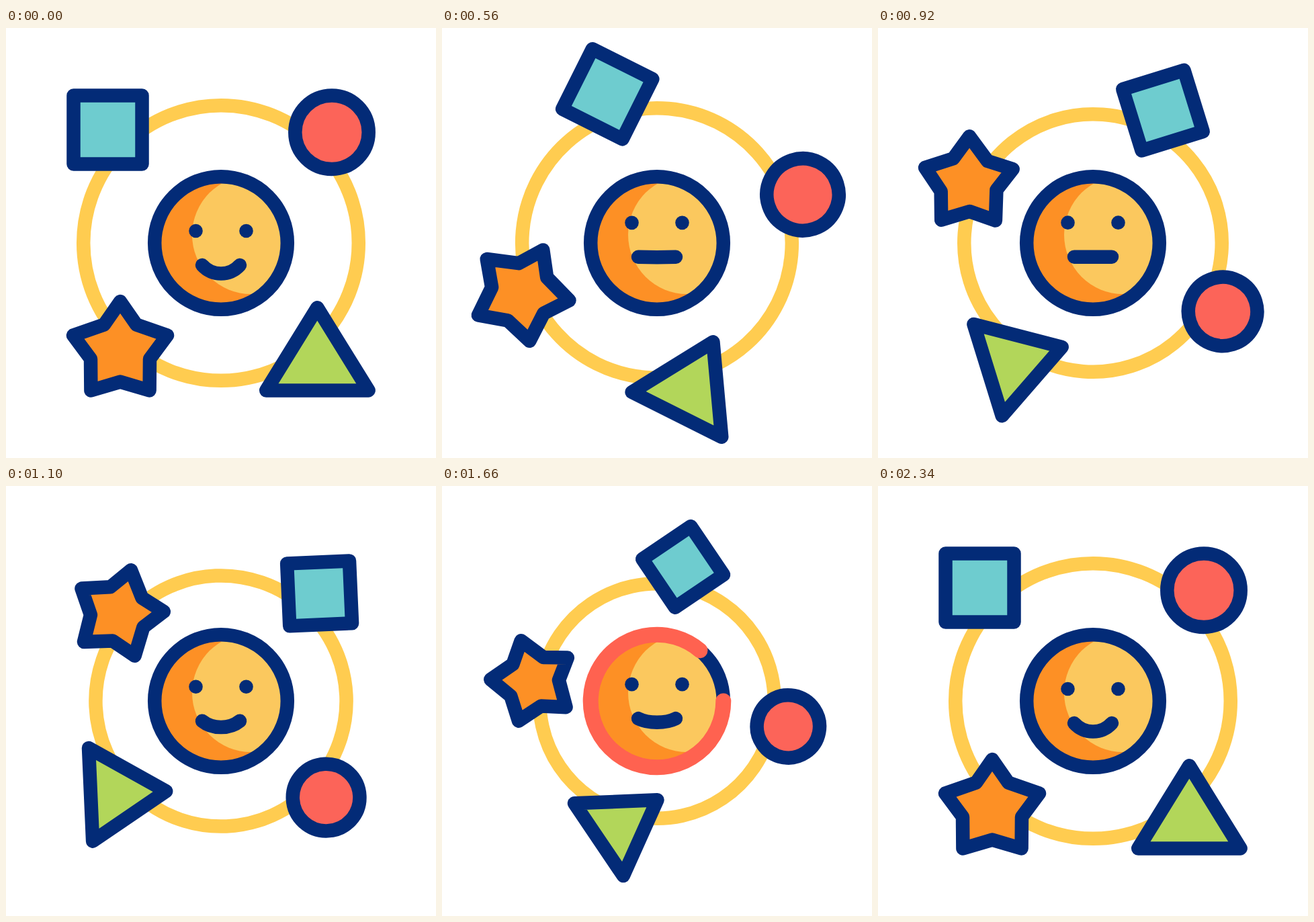
Animation of 640x640 px, one loop 2400 ms. Source, as an HTML page:

```html
<!DOCTYPE html>
<html lang="en">
<head>
<meta charset="utf-8">
<title>Orbiting shapes</title>
<style>
  html, body { margin: 0; width: 100%; height: 100%; overflow: hidden; background: #fff; }
  svg { display: block; width: 640px; height: 640px; }
  .line { fill: none; stroke: #032b77; stroke-width: 20.5; stroke-linecap: round; }
  #orbit { stroke: #032b77; stroke-linejoin: round; }
</style>
</head>
<body>
<svg viewBox="0 0 640 640">
  <clipPath id="disc"><circle cx="320" cy="320" r="98"/></clipPath>

  <g id="orbit">
    <circle cx="320" cy="320" r="204.8" fill="none" stroke="#ffcc50"/>
    <rect x="100.5" y="100.5" width="102" height="102" fill="#6ecccf"/>
    <circle cx="485" cy="155.2" r="54.7" fill="#fc6459"/>
    <path d="M463.3 416.2L539.6 539.4H387.2Z" fill="#b2d65a"/>
    <path d="M170 407L194 441.5L240 457.5L214 492.5L213.6 539.5L170 526.6L126.4 539.5L126 492.5L100 457.5L146 441.5Z" fill="#fd9025"/>
  </g>

  <circle cx="320" cy="320" r="98" fill="#fd9025"/>
  <circle cx="365.3" cy="307.8" r="88.3" fill="#fbc85e" clip-path="url(#disc)"/>
  <circle class="line" cx="320" cy="320" r="98.8"/>
  <path id="sweep" fill="none" stroke="#ff6250" stroke-width="23" stroke-linecap="round"/>
  <g id="eyes" fill="#032b77">
    <circle cx="282.5" cy="302" r="10.3"/>
    <circle cx="357.5" cy="302" r="10.3"/>
  </g>
  <path id="mouth" class="line"/>
</svg>

<script>
const LOOP = 2400, STEP = 20, CENTER = 320, SWEEP_R = 98.8, STROKE = 20.5;
const [orbit, sweep, eyes, mouth] =
  ['orbit', 'sweep', 'eyes', 'mouth'].map(id => document.getElementById(id));

// Each track lists [time in ms, value]; values ease smoothly between keys.
const tracks = {
  angle: [[200, 0], [1200, 90], [2300, 0]],
  scale: [[200, 1], [1800, 0.85], [2300, 1]],
  smile: [[200, 1], [600, 0], [900, 0], [1200, 1], [1500, 1], [1800, 0], [2300, 1]],
  head:  [[1200, 0], [1800, 1]],
  tail:  [[1800, 0], [2300, 1]]
};

function valueAt(keys, t) {
  if (t <= keys[0][0]) return keys[0][1];
  for (let i = 1; i < keys.length; i++) {
    const [t0, a] = keys[i - 1], [t1, b] = keys[i];
    if (t < t1) {
      const s = (t - t0) / (t1 - t0);
      return a + (b - a) * s * s * (3 - 2 * s);
    }
  }
  return keys[keys.length - 1][1];
}

function arcPath(from, to) {
  const point = turn => {
    const a = turn * 2 * Math.PI;
    return `${CENTER + SWEEP_R * Math.cos(a)} ${CENTER + SWEEP_R * Math.sin(a)}`;
  };
  const arc = turn => `A${SWEEP_R} ${SWEEP_R} 0 0 1 ${point(turn)}`;
  const span = Math.max(to - from, 0.0001);
  return 'M' + point(from) + [1, 2, 3].map(i => arc(from + span * i / 3)).join('');
}

function draw(t) {
  const { angle, scale, smile, head, tail } = Object.fromEntries(
    Object.entries(tracks).map(([name, keys]) => [name, valueAt(keys, t)]));

  orbit.setAttribute('transform',
    `translate(${CENTER} ${CENTER}) rotate(${angle}) scale(${scale}) translate(${-CENTER} ${-CENTER})`);
  // Line weight stays constant while the shapes shrink.
  orbit.setAttribute('stroke-width', STROKE / scale);

  eyes.setAttribute('transform', `translate(0 ${-12.5 * (1 - smile)})`);
  const y = 340.5 + 12.5 * smile, low = y + 16.7 * smile;
  mouth.setAttribute('d', `M292 ${y}C307 ${low} 333 ${low} 348 ${y}`);

  const swept = t >= 1200 && t < 2340;
  sweep.setAttribute('d', swept ? arcPath(tail, head) : '');
}

const start = performance.now();
function tick() {
  const t = (performance.now() - start) % LOOP;
  draw(Math.floor(t / STEP) * STEP);
  requestAnimationFrame(tick);
}
draw(0);
requestAnimationFrame(tick);
</script>
</body>
</html>
```
